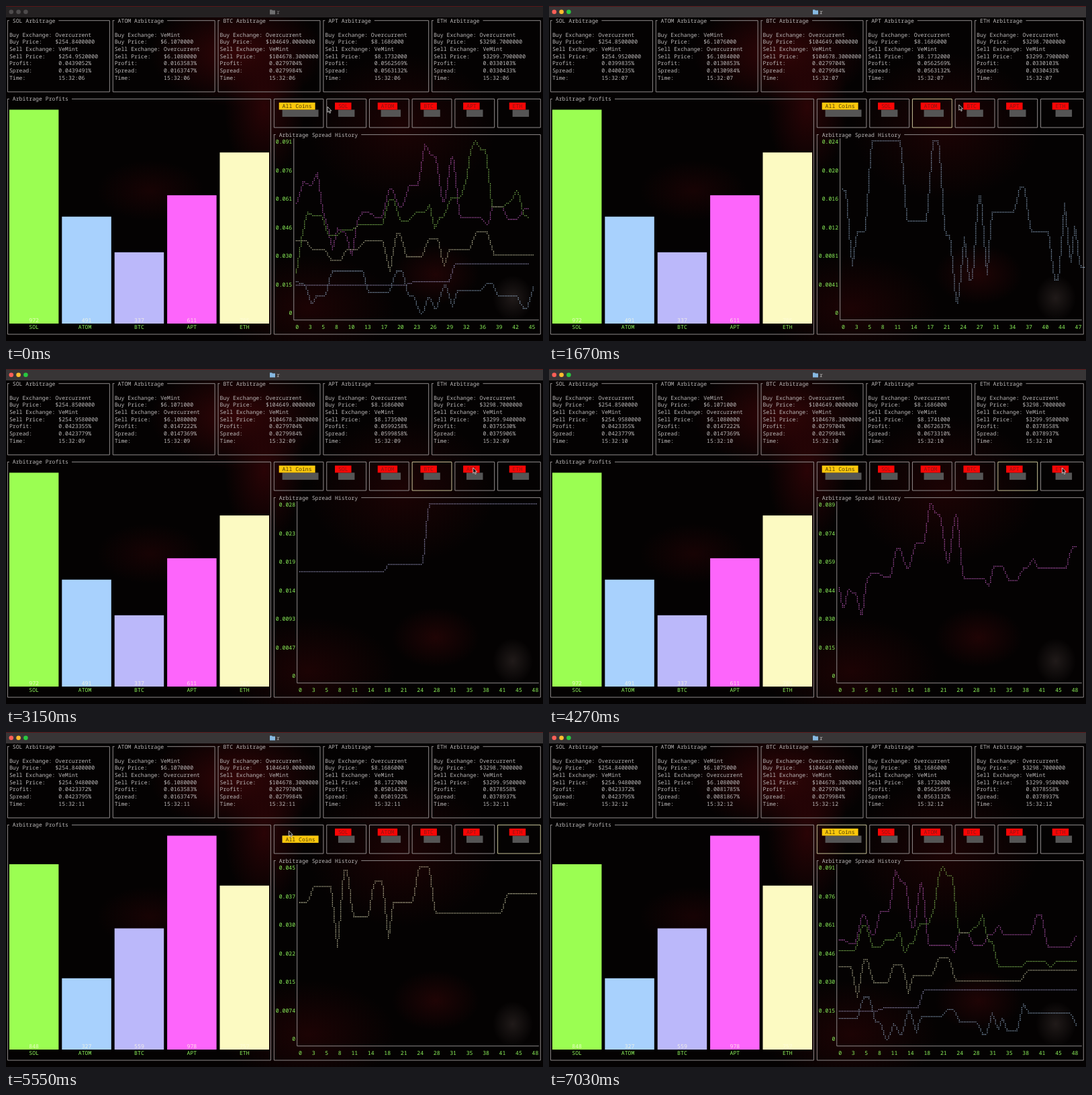
An HTML page for the animation above (7060 ms loop, 800x499 px).

```html
<!DOCTYPE html>
<html lang="en">
<head>
<meta charset="utf-8">
<title>Arbitrage dashboard</title>
<style>
  html, body { margin: 0; width: 100%; height: 100%; overflow: hidden; background: #040202; }
  svg { display: block; width: 100vw; height: 100vh; }
  text {
    font: 8.167px "Noto Sans Mono", "DejaVu Sans Mono", monospace;
    white-space: pre; fill: #bcbaba; text-rendering: geometricPrecision;
  }
  .line { fill: none; stroke: #8e8a8a; stroke-width: 1; }
  .axis { fill: #8cf35a; }
  .total { fill: #fffce0; opacity: .8; }
  .plot { fill: none; stroke-width: 1.3; opacity: .8; filter: saturate(.8); }
</style>
</head>
<body>
<svg id="stage" viewBox="0 0 800 499" preserveAspectRatio="none"></svg>
<script>
const LOOP = 7060, CW = 4.9, RH = 10.62;
const stage = document.getElementById('stage');

// Terminal grid: column edge, column middle, row middle
const colX = c => c * CW;
const midX = c => (c + 0.5) * CW;
const rowY = r => 21.7 + r * RH;

function el(tag, attrs, parent = stage) {
  const node = document.createElementNS('http://www.w3.org/2000/svg', tag);
  for (const k in attrs) node.setAttribute(k, attrs[k]);
  parent.appendChild(node);
  return node;
}
function set(node, attrs) {
  for (const k in attrs) {
    const v = String(attrs[k]);
    if (node.getAttribute(k) !== v) node.setAttribute(k, v);
  }
}
function write(node, str) {
  if (node.textContent !== str) node.textContent = str;
}
function label(c, r, str, attrs = {}, parent = stage) {
  const node = el('text', { x: colX(c), y: rowY(r) + 2.9, ...attrs }, parent);
  node.textContent = str;
  return node;
}
function rect(x, y, width, height, fill, parent = stage) {
  return el('rect', { x, y, width, height, fill }, parent);
}
function frame(c0, r0, c1, r1, title) {
  const l = midX(c0), r = midX(c1), t = rowY(r0), b = rowY(r1);
  let d = `M${l} ${t}V${b}H${r}V${t}`;
  if (title) {
    d += `H${colX(c0 + 3 + title.length)}M${l - 0.5} ${t}H${colX(c0 + 1)}`;
    label(c0 + 2, r0, title);
  } else d += 'Z';
  return el('path', { d, class: 'line' });
}
const latest = (steps, t) => steps.filter(s => s[0] <= t).pop();

// Backdrop: soft glows seen through the window
rect(0, 0, 800, 499, '#040202');
const defs = el('defs', {});
[
  [345, 70, 130, 80, '#330507'], [385, 150, 60, 110, '#2a0406'], [590, 180, 140, 110, '#1c0304'],
  [215, 275, 80, 45, '#170304'], [640, 400, 65, 45, '#1f0405'], [450, 450, 130, 80, '#1c0304'],
  [755, 435, 30, 34, '#201a19']
].forEach(([cx, cy, rx, ry, color], i) => {
  const g = el('radialGradient', { id: 'glow' + i }, defs);
  el('stop', { offset: 0, 'stop-color': color }, g);
  el('stop', { offset: 1, 'stop-color': color, 'stop-opacity': 0 }, g);
  el('ellipse', { cx, cy, rx, ry, fill: `url(#glow${i})` });
});

// Title bar
const bar = rect(0, 0, 800, 17, '#383536');
rect(0, 0, 800, 1, '#591518');
const lights = ['#ff5f57', '#febc2e', '#28c840'].map((color, i) =>
  [el('circle', { cx: 7.8 + i * 10.8, cy: 8.8, r: 3.3 }), color]);
const folder = el('path', { d: 'M393 5.5h3l1 1h4v6h-8z' });
const heading = el('text', { x: 403, y: 11.5 });
heading.textContent = 'r';

function drawTitle(t) {
  const active = t >= 380;
  set(bar, { fill: active ? '#383536' : '#242122' });
  lights.forEach(([dot, color]) => set(dot, { fill: active ? color : '#4e4b4c' }));
  set(folder, { fill: active ? '#86b9e2' : '#6f6f70' });
  set(heading, { style: 'fill:' + (active ? '#c4c2c2' : '#858383') });
}

// Quotes are [clock tick, buy, sell]; spread keys are "sample:level"
const COINS = [
  { name: 'SOL', color: '#9bfe52', head: 44,
    quotes: [[0, 254.84, 254.952], [0.5, 254.85, 254.952], [3, 254.85, 254.958], [5, 254.84, 254.948]],
    keys: '0:68 1:117 2:158 3:153 6:124 9:132 12:140 17.5:175 19.7:143 22.4:156 25.2:167 26.1:133 27:149 29.1:179 32.2:205 33:252 33.8:264 34.7:251 37:165 40.4:174 41.8:192 43:151 45:116 51:124 55.6:113 56.7:124' },
  { name: 'ATOM', color: '#a8d1fd', head: 45, swap: true,
    quotes: [[0, 6.107, 6.108], [0.5, 6.1076, 6.1084], [2, 6.1071, 6.1084], [3, 6.1071, 6.108],
      [5, 6.107, 6.108], [6, 6.1075, 6.108]],
    keys: '0:53 1.5:50 2.9:20 3.8:34 6.7:70 13.7:38 18.8:70 21.2:33 23.4:6 25:32 26:15 27.8:48 29.5:16 30.4:42 36:52 38.1:34 42.8:15 44.8:46 46:20 46.8:38 47.8:20 51:60 52.2:46 61.8:26' },
  { name: 'BTC', color: '#bbb8fa', head: 44, quotes: [[0, 104649, 104678.3]],
    keys: '0:50 22:53 30:80.6' },
  { name: 'APT', color: '#fd65fb', head: 44,
    quotes: [[0, 8.1686, 8.1732], [3, 8.1686, 8.1735], [4, 8.1686, 8.1741], [5, 8.1686, 8.1727], [6, 8.1686, 8.1732]],
    keys: '0:170 1.3:203 2.5:197 4:217 5:158 6:135 6.8:100 7.8:134 8.8:127 10.5:90 11.5:145 12.4:156 15:150 17.5:192 19.4:164 21.3:198 24.3:260 25.2:243 26:240 27.6:172 29.3:240 30.9:148 36.2:136 37:165 40:146 43:162 45:177 46:162 52.8:193 54.9:145 60.6:160' },
  { name: 'ETH', color: '#fcfac2', head: 45,
    quotes: [[0, 3298.7, 3299.79], [2, 3298.7, 3299.87], [3, 3298.7, 3299.94], [4, 3298.7, 3299.95]],
    keys: '0:116 2.9:103 6.5:87 9.6:103 12.8:114 17.6:70 18.9:126 20.8:92 25:118 27.9:76 28.9:103 34:128.5 37.3:95 51.8:109' }
];

// Price cards
const EXCHANGES = ['Overcurrent', 'VeMint'];
const CARD_EDGES = [0, 32, 64, 96, 129, 163];
COINS.forEach((coin, i) => {
  const c = CARD_EDGES[i];
  frame(c, 0, CARD_EDGES[i + 1] - 1, 10, coin.name + ' Arbitrage');
  const [buy, sell] = coin.swap ? [...EXCHANGES].reverse() : EXCHANGES;
  label(c + 1, 2, 'Buy Exchange: ' + buy);
  label(c + 1, 4, 'Sell Exchange: ' + sell);
  coin.lines = [3, 5, 6, 7, 8].map(r => label(c + 1, r, ''));
});

const tickAt = t => Math.max(0, (t - 90) / 1000);
function drawCards(t) {
  const tick = tickAt(t);
  const clock = '15:32:' + String(6 + Math.floor(tick)).padStart(2, '0');
  COINS.forEach(({ quotes, lines }) => {
    const [, buy, sell] = latest(quotes, tick);
    const spread = (sell - buy) / buy * 100;
    [
      'Buy Price:    $' + buy.toFixed(7),
      'Sell Price:    $' + sell.toFixed(7),
      'Profit:        ' + (spread * 0.999).toFixed(7) + '%',
      'Spread:        ' + spread.toFixed(7) + '%',
      'Time:          ' + clock
    ].forEach((str, i) => write(lines[i], str));
  });
}

// Profit bars: the largest total fills 30 rows
frame(0, 11, 80, 44, 'Arbitrage Profits');
const PROFITS = [[0, [972, 491, 337, 611, 785]], [5, [848, 327, 559, 978, 757]]];
const bars = COINS.map(({ name, color }, i) => {
  const c = 1 + 16 * i;
  const box = rect(colX(c), 0, 15 * CW, 0, color);
  label(c + Math.floor((15 - name.length) / 2), 43, name, { class: 'axis' });
  return { box, total: label(c + 6, 42, '', { class: 'total' }) };
});
function drawBars(t) {
  const totals = latest(PROFITS, tickAt(t))[1];
  const max = Math.max(...totals);
  bars.forEach(({ box, total }, i) => {
    const height = Math.floor(totals[i] / max * 30) * RH;
    set(box, { y: rowY(42.5) - height, height });
    write(total, String(totals[i]));
  });
}

// Buttons: name, left column, press time
const BUTTONS = [
  ['SOL', 97, 380], ['ATOM', 110, 1250], ['BTC', 123, 2150],
  ['APT', 136, 3300], ['ETH', 149, 4420], ['All Coins', 81, 5500]
].map(([name, c0, press], i, list) => {
  const all = name === 'All Coins';
  const c1 = all ? 96 : i === 4 ? 162 : list[i + 1][1] - 1;
  const width = name.length + 2;
  const c = c0 + 1 + Math.floor((c1 - c0 - 2 - width) / 2);
  const box = frame(c0, 11, c1, 15);
  rect(colX(c + 1), rowY(12.5), colX(width), RH, '#555');
  const face = el('g', {});
  rect(colX(c), rowY(11.5), colX(width), RH, all ? '#fcc80c' : '#f80606', face);
  label(c + 1, 12, name, { style: 'fill:' + (all ? '#4c3c08' : '#8c1512') }, face);
  return { name, box, face, press, x: colX(c + 3) };
});
const pressedBy = (t, delay) => BUTTONS.filter(b => b.press + delay <= t).pop();
function drawButtons(t) {
  const focus = pressedBy(t, 100);
  BUTTONS.forEach(b => {
    const down = t >= b.press && t < b.press + 180;
    set(b.face, { transform: down ? `translate(${CW} ${RH})` : 'translate(0 0)' });
    set(b.box, { style: b === focus ? 'stroke:#c4c096' : '' });
  });
}

// Spread history
frame(81, 16, 162, 44, 'Arbitrage Spread History');
const axes = el('path', { class: 'line' });
const yLabels = [0, 1, 2, 3, 4, 5, 6].map(i => label(0, 17 + 4 * i, '', { class: 'axis' }));
const xLabels = label(0, 43, '', { class: 'axis' });
['APT', 'ETH', 'BTC', 'ATOM', 'SOL'].forEach(name => {
  const coin = COINS.find(c => c.name === name);
  coin.keys = coin.keys.split(' ').map(s => s.split(':').map(Number));
  coin.plot = el('path', { class: 'plot', stroke: coin.color });
});

// A spread holds its level, then ramps to the next within RAMP samples
const RAMP = 1.2, UNIT = 0.0917 / 264;
function spreadAt(keys, k) {
  const i = keys.findIndex(p => p[0] > k);
  if (i < 0) return keys[keys.length - 1][1];
  const [k0, v0] = keys[i - 1], [k1, v1] = keys[i];
  const ramp = Math.min(RAMP, k1 - k0);
  return v0 + (v1 - v0) * Math.max(0, 1 - (k1 - k) / ramp);
}

// Braille dots: two across and four down in every cell
const DX = CW / 2, DY = RH / 4, TOP = rowY(-0.5);
function dots(levels, max, c0) {
  const rows = levels.map(v => Math.floor((465 - v / max * 264 - TOP) / DY));
  const marks = new Set();
  rows.forEach((row, j) => {
    const prev = j ? rows[j - 1] : row;
    const n = Math.max(1, Math.abs(row - prev));
    for (let i = 1; i <= n; i++) {
      const col = 2 * c0 + (i * 2 < n ? j - 1 : j);
      const y = TOP + (prev + (row - prev) * i / n + 0.5) * DY;
      marks.add(`M${((col + 0.25) * DX).toFixed(2)} ${y.toFixed(2)}h1.3`);
    }
  });
  return [...marks].join('');
}

// Ticks are joined by three spaces; each reads the sample above its column
function tickLine(size) {
  let line = '0';
  for (let i = 1; i < 16; i++) {
    line += '   ';
    line += Math.round(line.length * size / 72.3);
  }
  return line;
}

let shown = '';
function drawChart(t) {
  const button = pressedBy(t, 300);
  const view = button ? button.name : 'All Coins';
  const added = Math.floor(t / 410 + 0.35);
  const key = view + added;
  if (key === shown) return;
  shown = key;

  const size = Math.min(49, Math.max(46, 44 + added));
  const active = COINS.filter(c => view === 'All Coins' || c.name === view);
  const lines = active.map(({ keys, head }) => {
    const last = head + added, first = Math.max(0, last - 48);
    const levels = [];
    for (let j = 0; j < 148 && first + j * size / 148 <= last; j++) {
      levels.push(spreadAt(keys, first + j * size / 148));
    }
    return levels;
  });
  const max = Math.max(...lines.flat());
  const ys = yLabels.map((_, i) => i < 6 ? (max * UNIT * (6 - i) / 6).toPrecision(2) : '0');
  const axis = 82 + Math.max(...ys.map(s => s.length));

  set(axes, { d: `M${midX(axis)} ${rowY(16.5)}V${rowY(42)}H${colX(162)}` });
  ys.forEach((s, i) => {
    set(yLabels[i], { x: colX(axis - s.length) });
    write(yLabels[i], s);
  });
  set(xLabels, { x: colX(axis + 1) });
  write(xLabels, tickLine(size));
  COINS.forEach(c => set(c.plot, { d: '' }));
  active.forEach((c, i) => set(c.plot, { d: dots(lines[i], max, axis + 1) }));
}

// Pointer: rests on each button before its press, then leaves over the top
const PATH = [
  [0, 479, 150],
  ...BUTTONS.flatMap(b => [[b.press - 250, b.x, 147], [b.press + 60, b.x, 147]]),
  [6650, 350, -20], [LOOP, 350, -20]
];
const pointer = el('path', {
  d: 'M0 0V8.3L1.9 6.6L3.2 9.6L4.6 9L3.3 6.1H5.8Z',
  fill: '#080808', stroke: '#e8e8e8', 'stroke-width': 0.8
});
function drawPointer(t) {
  const i = PATH.findIndex(p => p[0] > t);
  const [t0, x0, y0] = PATH[i - 1], [t1, x1, y1] = PATH[i];
  const u = (t - t0) / (t1 - t0), e = u * u * (3 - 2 * u);
  set(pointer, { transform: `translate(${x0 + (x1 - x0) * e} ${y0 + (y1 - y0) * e})` });
}

const start = performance.now();
function draw() {
  const t = (performance.now() - start) % LOOP;
  [drawTitle, drawCards, drawBars, drawButtons, drawChart, drawPointer].forEach(f => f(t));
  requestAnimationFrame(draw);
}
draw();
</script>
</body>
</html>
```
